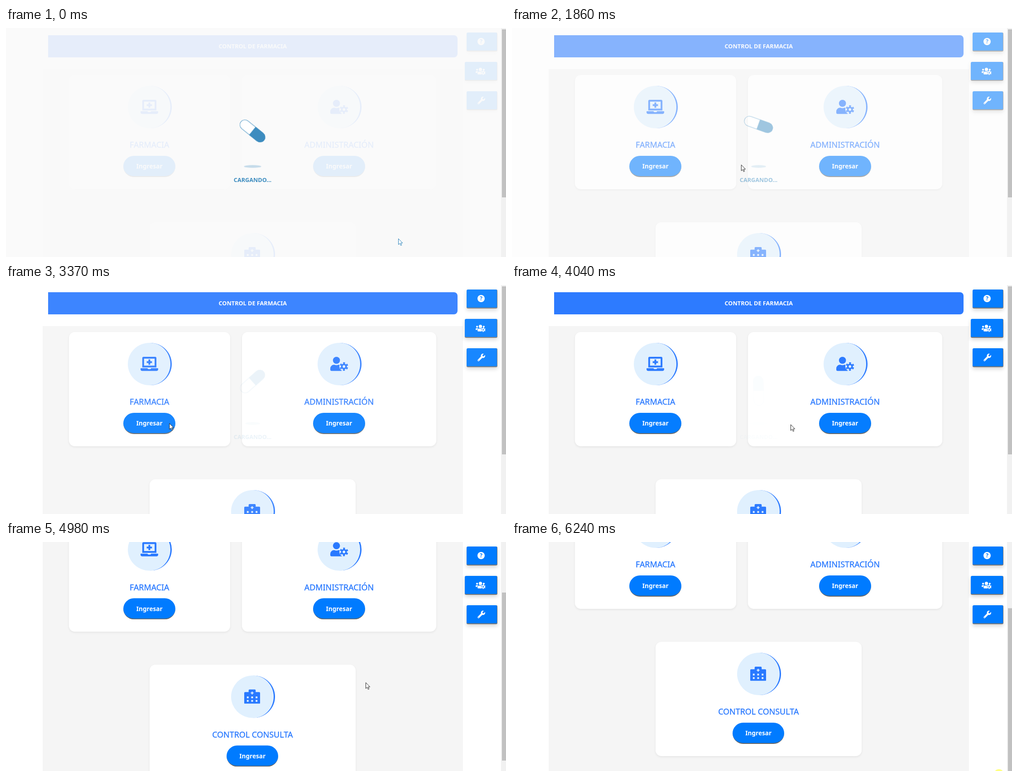
Write an HTML page that moves like this. It is 1104 by 507 pixels and loops after 6.31 s.

```html
<!DOCTYPE html>
<html lang="es">
<head>
<meta charset="utf-8">
<title>Control de farmacia</title>
<style>
  @property --scroll { syntax: "<number>"; inherits: true; initial-value: 0; }
  :root { --blue: #007bff; --royal: #2979ff; --tint: #e0f0fe; --pill: #2980b9; --sine: cubic-bezier(.37, 0, .63, 1); }
  html, body { margin: 0; width: 100%; height: 100%; overflow: hidden; background: #fff; }
  body { position: relative; font-family: "Noto Sans", "Open Sans", sans-serif; }
  body * { box-sizing: border-box; }
  .stage { position: absolute; left: 0; top: 0; width: 1104px; height: 507px; overflow: hidden; background: #fff; }
  .stage div, .stage > svg { position: absolute; }
  svg { display: block; overflow: visible; }

  .stage, .loader, .capsule, .spin, .shade, .cursor, .click { animation: 6310ms linear infinite; }
  .stage { animation-name: scroll; animation-timing-function: step-end; }

  /* scrolling page */
  .page { left: 0; top: 0; width: 1093px; height: 800px; transform: translateY(calc(var(--scroll) * -1px)); }
  .panel { left: 81px; top: 90.5px; width: 928px; height: 710px; background: #f5f5f5; }
  .header { left: 93px; top: 15.5px; width: 903.5px; height: 49px; border-radius: 0 8px 8px 0;
    background: var(--royal); color: #fff; font-size: 12.7px; font-weight: 700; line-height: 49px; text-align: center; }
  .card { top: 103.5px; height: 253px; border-radius: 13px; background: #fff; box-shadow: 0 2px 5px rgba(0, 0, 0, .07); }
  .badge { left: calc(50% - 47.5px); top: 24px; width: 97px; height: 94.5px; border-radius: 50%;
    border-right: 3px solid var(--royal); background: var(--tint); color: var(--royal);
    display: flex; align-items: center; justify-content: center; }
  .title { left: 0; right: 0; top: 139px; color: var(--royal); -webkit-text-stroke: .35px var(--royal);
    font-size: 17.9px; line-height: 30px; text-align: center; }
  .enter { left: calc(50% - 57.3px); top: 179px; width: 114.5px; height: 47.5px; border-radius: 24px;
    border-bottom: 2px solid #666; background: var(--blue); color: #fff;
    font-weight: 600; font-size: 13.6px; line-height: 46px; text-align: center; }

  /* fixed tools */
  .tool { left: 1017px; width: 68px; height: 42px; border-radius: 3px; background: var(--blue); color: #fff;
    border: solid #777; border-width: 0 1px 2px 0; box-shadow: 0 4px 8px rgba(0, 0, 0, .17);
    display: flex; align-items: center; justify-content: center; padding-right: 3px; }
  .tool .help { position: static; font-size: 12px; font-weight: 700; width: 16px; height: 16px; line-height: 16px;
    border-radius: 50%; text-align: center; background: #fff; color: var(--blue); }
  .track { left: 1093px; top: 0; width: 11px; height: 507px; background: #f1f1f1; }
  .thumb { left: 2px; top: 3px; width: 9px; height: 372px; background: #c1c1c1;
    transform: translateY(calc(var(--scroll) * .687px)); }

  /* loading veil */
  .loader { left: 0; top: 0; width: 1093px; height: 507px; background: #fafafa; animation-name: fade; }
  .loader svg { position: absolute; left: 0; top: 0; }
  .wait { left: 444.5px; top: 326px; width: 200px; line-height: 20px; text-align: center;
    font-size: 12.7px; font-weight: 700; color: var(--pill); }
  .capsule { animation-name: bounce; }
  .spin { animation-name: spin; }
  .shade { animation-name: shade; }

  .cursor { left: 0; top: 0; fill: #fff; animation-name: move, ink; }
  .click { left: 1063.5px; top: 503px; width: 22px; height: 22px; border-radius: 50%; background: #ffff80; animation-name: click; }

  @keyframes fade {
    0% { opacity: .907; } 10% { opacity: .78; } 20% { opacity: .618; } 30% { opacity: .441; }
    40% { opacity: .271; } 50% { opacity: .13; } 60% { opacity: .036; } 70%, 100% { opacity: 0; }
  }
  @keyframes bounce {
    0%, .55% { transform: translate(544.3px, 228px); animation-timing-function: cubic-bezier(.39, .575, .565, 1); }
    5.97%, 28.68%, 57.02% { transform: translate(544.3px, 212.5px); animation-timing-function: var(--sine); }
    14.5%, 42.94%, 71.28%, 100% { transform: translate(544.3px, 239.5px); animation-timing-function: var(--sine); }
  }
  @keyframes shade {
    0%, .55% { transform: translate(544.5px, 306.5px) scaleX(.97); animation-timing-function: cubic-bezier(.39, .575, .565, 1); }
    5.97%, 28.68%, 57.02% { transform: translate(544.5px, 306.5px) scaleX(.82); animation-timing-function: var(--sine); }
    14.5%, 42.94%, 71.28%, 100% { transform: translate(544.5px, 306.5px) scaleX(1.07); animation-timing-function: var(--sine); }
  }
  @keyframes spin {
    0%, .55% { transform: rotate(39deg); } 18.94% { transform: rotate(469deg); } 40.81% { transform: rotate(1030deg); }
    53.96% { transform: rotate(1414deg); } 100% { transform: rotate(2759deg); }
  }
  @keyframes move {
    0%, 10% { transform: translate(866px, 466px); }
    14.8% { transform: translate(739px, 407px); }
    18.94% { transform: translate(568px, 345px); }
    40.81% { transform: translate(439px, 257px); }
    53.96% { transform: translate(357px, 308px); }
    71%, 75.5% { transform: translate(793px, 309px); }
    79.4% { transform: translate(794px, 311px); }
    85.9% { transform: translate(982px, 426px); }
    94.9%, 100% { transform: translate(1068px, 508px); }
  }
  @keyframes ink { 0%, 10% { stroke: var(--pill); } 10.01%, 100% { stroke: #222; } }
  /* the wheel scroll is seen in discrete jumps */
  @keyframes scroll {
    0% { --scroll: 0; } 74.9% { --scroll: 2.5; } 76% { --scroll: 23; } 77% { --scroll: 67; }
    78% { --scroll: 114; } 78.9% { --scroll: 158.5; } 80% { --scroll: 197; } 81%, 100% { --scroll: 209; }
  }
  @keyframes click { 0%, 98.88% { opacity: 0; } 98.89%, 100% { opacity: 1; } }
</style>
</head>
<body>
<svg width="0" height="0" style="position:absolute">
  <defs>
    <g id="gear" fill="none" stroke="currentColor">
      <circle r="77" stroke-width="60"/>
      <circle r="129" stroke-width="52" pathLength="12" stroke-dasharray="1 1" stroke-dashoffset="-.5"/>
    </g>
    <g id="laptop">
      <path d="M232 224h56v56a8 8 0 0 0 8 8h48a8 8 0 0 0 8-8v-56h56a8 8 0 0 0 8-8v-48a8 8 0 0 0-8-8h-56v-56a8 8 0 0 0-8-8h-48a8 8 0 0 0-8 8v56h-56a8 8 0 0 0-8 8v48a8 8 0 0 0 8 8z"/>
      <path fill-rule="evenodd" d="M576 48a48 48 0 0 0-48-48H112a48 48 0 0 0-48 48v336h512zM512 320H128V64h384z"/>
      <path d="M624 416H381c0 20-14 32-32 32h-61c-19 0-33-17-33-32H16a16 16 0 0 0-16 16v16a64 64 0 0 0 64 64h512a64 64 0 0 0 64-64v-16a16 16 0 0 0-16-16z"/>
    </g>
    <g id="admin">
      <circle cx="224" cy="128" r="128"/>
      <path d="M314 288h-17a174 174 0 0 1-146 0h-17A134 134 0 0 0 0 422v42a48 48 0 0 0 48 48h352q14 0 25-7V340q-45-52-111-52z"/>
      <circle cx="496" cy="352" r="168" fill="var(--tint)"/>
      <use href="#gear" x="496" y="352"/>
    </g>
    <g id="hospital">
      <path d="M32 96h128V32a32 32 0 0 1 32-32h192a32 32 0 0 1 32 32v64h128a32 32 0 0 1 32 32v368a16 16 0 0 1-16 16H16a16 16 0 0 1-16-16V128a32 32 0 0 1 32-32z"/>
      <path stroke="var(--tint)" stroke-width="34" d="M236 128h104M288 76v104"/>
      <path stroke="var(--tint)" stroke-width="64" stroke-dasharray="64 96" d="M96 288h400M96 416h400"/>
    </g>
    <g id="team">
      <circle cx="96" cy="160" r="64"/><circle cx="320" cy="144" r="112"/><circle cx="544" cy="160" r="64"/>
      <path d="M64 256h64q30 0 47 20-62 34-73 108H32a32 32 0 0 1-32-32v-32a64 64 0 0 1 64-64zM243 288h154q70 10 110 60v132H176a48 48 0 0 1-48-48v-29a115 115 0 0 1 115-115z"/>
      <circle cx="510" cy="366" r="150" fill="var(--blue)"/>
      <use href="#gear" x="510" y="366"/>
    </g>
    <path id="wrench" fill-rule="evenodd" d="M508 109c-2-9-14-12-20-5l-75 74-68-11-11-68 74-75c7-6 4-18-5-20-48-12-100 1-137 38-40 40-50 97-34 147L19 403a64 64 0 0 0 90 90l213-213c50 17 108 6 148-34 37-37 50-89 38-137zM64 472a24 24 0 1 1 0-48 24 24 0 0 1 0 48z"/>
  </defs>
</svg>

<div class="stage">
  <div class="page">
    <div class="panel"></div>
    <div class="header">CONTROL DE FARMACIA</div>
    <div class="card" style="left:138.5px;width:356.5px">
      <div class="badge"><svg width="39" height="31.2" viewBox="0 0 640 512" fill="currentColor"><use href="#laptop"/></svg></div>
      <div class="title">FARMACIA</div>
      <div class="enter">Ingresar</div>
    </div>
    <div class="card" style="left:521px;width:429px">
      <div class="badge"><svg width="39" height="31.2" viewBox="0 0 640 512" fill="currentColor"><use href="#admin"/></svg></div>
      <div class="title">ADMINISTRACIÓN</div>
      <div class="enter">Ingresar</div>
    </div>
    <div class="card" style="left:317px;width:454.5px;top:429.5px">
      <div class="badge"><svg width="35" height="31.2" viewBox="0 0 576 512" fill="currentColor"><use href="#hospital"/></svg></div>
      <div class="title">CONTROL CONSULTA</div>
      <div class="enter">Ingresar</div>
    </div>
  </div>

  <div class="tool" style="top:10px"><div class="help">?</div></div>
  <div class="tool" style="top:75px;left:1013px;width:72px"><svg width="21" height="16.8" viewBox="0 0 640 512" fill="currentColor"><use href="#team"/></svg></div>
  <div class="tool" style="top:140px"><svg width="17" height="17" viewBox="0 0 512 512" fill="currentColor"><use href="#wrench"/></svg></div>

  <div class="loader">
    <svg width="1093" height="507">
      <ellipse class="shade" rx="19.8" ry="3" fill="var(--pill)" opacity=".28"/>
      <g class="capsule"><g class="spin" stroke="var(--pill)">
        <rect x="-32.7" y="-11" width="65.4" height="22" rx="11" fill="#fff"/>
        <path d="M0-11h21.7a11 11 0 0 1 0 22H0z" fill="var(--pill)"/>
      </g></g>
    </svg>
    <div class="wait">CARGANDO...</div>
  </div>

  <div class="track"><div class="thumb"></div></div>
  <div class="click"></div>
  <svg class="cursor" width="11" height="17"><path d="M.5.5v13l3-2.7 2.2 4.7 2-.9-2.1-4.6h4.1z"/></svg>
</div>
</body>
</html>
```
